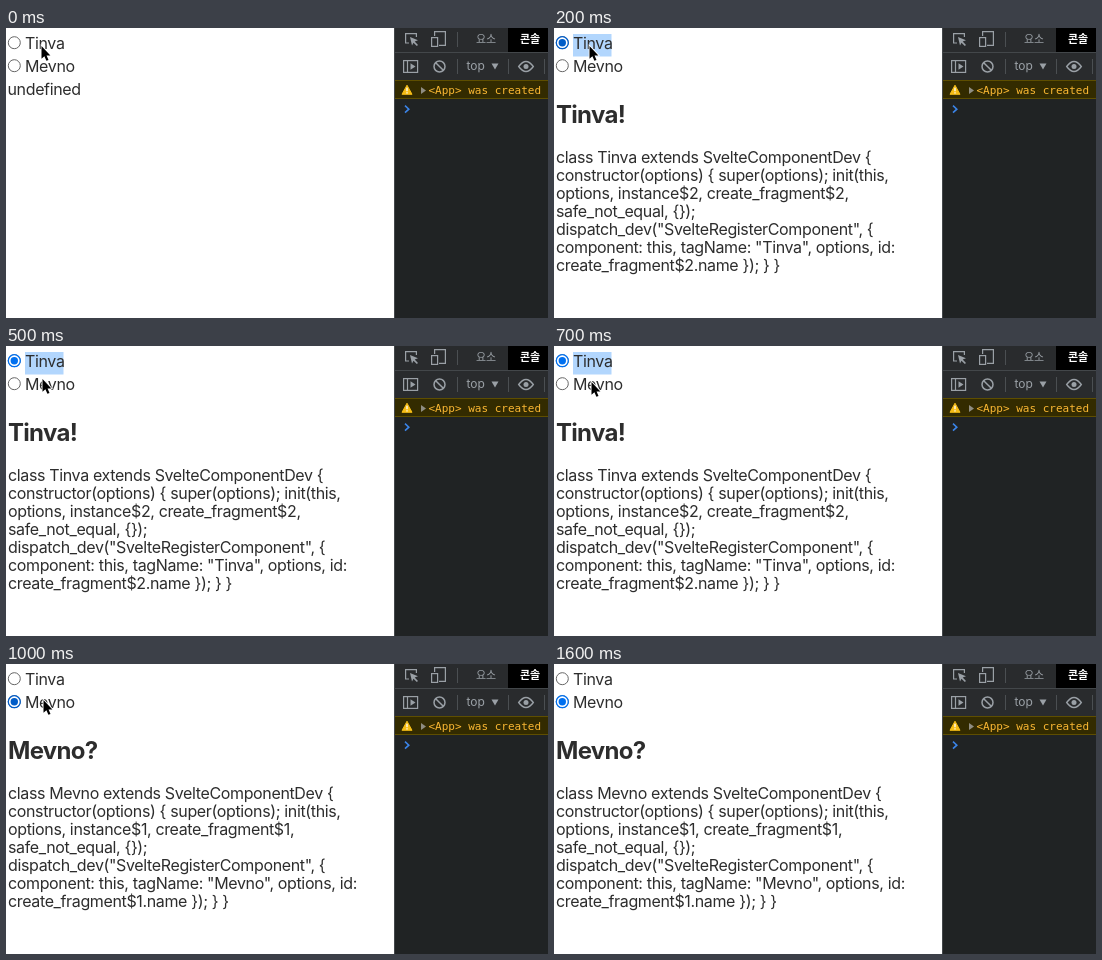
Write an HTML page that moves like this. It is 542 px wide and 290 px high and loops after 1.7 s.

```html
<!DOCTYPE html>
<html lang="ko">
<head>
<meta charset="utf-8">
<title>Component switch</title>
<style>
html, body { margin: 0; width: 100%; height: 100%; overflow: hidden; background: #fff; }
svg { position: absolute; left: 0; top: 0; display: block; }
.page { font: 16px Inter, "Liberation Sans", sans-serif; letter-spacing: -.36px; font-optical-sizing: none; fill: #2d2d2d; color: #2d2d2d; }
.page h2, .page p { position: absolute; left: 2px; margin: 0; white-space: pre; }
.page h2 { top: 72px; font-size: 24px; line-height: 29px; font-weight: 700; letter-spacing: -.7px; }
.page p { top: 120px; line-height: 18px; }
.ring { fill: #fff; stroke: #666; }
.on .ring { stroke: currentColor; stroke-width: 1.3; }
.on .dot { fill: currentColor; }
.ui { font: 12px Inter, "Noto Sans CJK KR", "Noto Sans CJK", sans-serif; fill: #9aa0a6; }
.tab { font-size: 11px; text-anchor: middle; }
.tab.open { fill: #fff; font-weight: 700; }
.icon { fill: none; stroke: #9aa0a6; stroke-width: 1.2; }
.solid { fill: #9aa0a6; stroke: none; }
.log { font: 11px "DejaVu Sans Mono", monospace; fill: #fbb833; }

/* 1700 ms loop, one 100 ms tick = 5.8824% */
.idle, .first, .second, .mark, .on, .press, .cursor { animation: 1.7s step-end infinite; }
.idle { animation-name: idle; }
.first { animation-name: first; }
.second { animation-name: second; }
.mark { animation-name: mark; }
.on { animation-name: tint; }
.press { animation-name: press; }
.cursor { animation-name: move; }
@keyframes idle { 0% { opacity: 1 } 5.882%, 100% { opacity: 0 } }
@keyframes first { 0% { opacity: 0 } 5.882% { opacity: 1 } 58.823%, 100% { opacity: 0 } }
@keyframes second { 0% { opacity: 0 } 58.823%, 100% { opacity: 1 } }
@keyframes mark { 0% { opacity: 0 } 5.882% { opacity: 1 } 52.941%, 100% { opacity: 0 } }
@keyframes press { 0% { stroke: #666 } 52.941% { stroke: #8d8d8d } 58.823%, 100% { stroke: #666 } }
@keyframes tint {
  0% { color: #005cc8 }
  29.411% { color: #0070f0 }
  58.823% { color: #005cc8 }
  70.588%, 100% { color: #0070f0 }
}
@keyframes move {
  0% { transform: translate(35px, 17px) }
  23.529% { transform: translate(35px, 27px) }
  29.411% { transform: translate(36px, 32px) }
  35.294% { transform: translate(37px, 34px) }
  41.176% { transform: translate(37px, 35px) }
  64.705% { transform: translate(41px, 38px) }
  70.588% { transform: translate(66px, 60px) }
  76.470% { transform: translate(112px, 101px) }
  82.352% { transform: translate(164px, 147px) }
  88.235% { transform: translate(187px, 168px); opacity: 1 }
  94.117%, 100% { transform: translate(187px, 168px); opacity: 0 }
}
</style>
</head>
<body>
<div class="page">
  <div class="first"><h2>Tinva!</h2><p>class Tinva extends SvelteComponentDev {
constructor(options) { super(options); init(this,
options, instance$2, create_fragment$2,
safe_not_equal, {});
dispatch_dev("SvelteRegisterComponent", {
component: this, tagName: "Tinva", options, id:
create_fragment$2.name }); } }</p></div>
  <div class="second"><h2>Mevno?</h2><p>class Mevno extends SvelteComponentDev {
constructor(options) { super(options); init(this,
options, instance$1, create_fragment$1,
safe_not_equal, {});
dispatch_dev("SvelteRegisterComponent", {
component: this, tagName: "Mevno", options, id:
create_fragment$1.name }); } }</p></div>
</div>

<svg width="542" height="290" viewBox="0 0 542 290">
  <!-- page form -->
  <g class="page">
    <rect class="mark" x="19" y="6" width="38.5" height="22.5" fill="#b2d6fd"/>
    <circle class="ring" cx="8.3" cy="14.7" r="6"/>
    <circle class="ring press" cx="8.3" cy="37.7" r="6"/>
    <g class="first"><g class="on">
      <circle class="ring" cx="8.3" cy="14.7" r="6"/><circle class="dot" cx="8.3" cy="14.7" r="3.7"/>
    </g></g>
    <g class="second"><g class="on">
      <circle class="ring" cx="8.3" cy="37.7" r="6"/><circle class="dot" cx="8.3" cy="37.7" r="3.7"/>
    </g></g>
    <text x="19" y="21">Tinva</text>
    <text x="19" y="44">Mevno</text>
    <text class="idle" x="1.5" y="67">undefined</text>
  </g>

  <!-- developer tools -->
  <rect x="388" width="154" height="290" fill="#202324"/>
  <rect x="389" width="153" height="52" fill="#292b2d"/>
  <rect x="502" width="40" height="24" fill="#000"/>
  <path d="M388.5 0V290M389 24.5H542" stroke="#43474a"/>
  <path d="M451.5 4V19M451.5 31V46M502.5 31V46M538.5 31V46" stroke="#4b4f52"/>
  <g class="icon">
    <path d="M403 15H399.6V5.6H410.4V9"/>
    <path class="solid" d="M404 9L412 12.3L408.7 13.5L412 17L410.8 18L407.5 14.7L406 17.5Z"/>
    <path d="M428.6 8V3.6H439.4V17.4H433"/>
    <rect x="425.6" y="9.6" width="6" height="8.8"/>
    <rect x="397.6" y="32.6" width="14" height="11.8"/>
    <path d="M401.5 33V44"/>
    <path class="solid" d="M404.5 35.3L409.5 38.5L404.5 41.7Z"/>
    <circle cx="433.5" cy="38.5" r="5.5" stroke-width="1.5"/>
    <path d="M429.7 34.7L437.3 42.3" stroke-width="1.5"/>
    <path d="M512.7 38.5Q520 28.5 527.3 38.5Q520 48.5 512.7 38.5Z" stroke-width="1.4"/>
    <circle class="solid" cx="520" cy="38.5" r="2.5"/>
  </g>
  <g class="ui">
    <text class="tab" x="480" y="14.5">요소</text>
    <text class="tab open" x="524" y="14.5">콘솔</text>
    <text x="460.5" y="42">top</text>
    <path d="M485.5 35.5H492.5L489 41.5Z"/>
  </g>
  <rect x="389" y="52" width="153" height="19" fill="#332b00"/>
  <path d="M389 52.5H542M389 70.5H542" stroke="#5e4e00"/>
  <path d="M401 57.2L406 66.3H396Z" fill="#f6bd16" stroke="#f6bd16" stroke-linejoin="round"/>
  <path d="M401 59.8V63.3M401 64.3V65.6" stroke="#fff" stroke-width="1.3"/>
  <path d="M415 59L420 62.5L415 66Z" fill="#8f8d82"/>
  <text class="log" x="422.5" y="66">&lt;App&gt; was created</text>
  <path d="M399 77.7L402.800 81.2L399 84.7" fill="none" stroke="#3b84e8" stroke-width="1.6"/>

  <path class="cursor" d="M.5 1V13.8L3.400 11.2L5.400 15.8L7.500 14.900L5.600 10.400H9.400Z" stroke="#fff" stroke-width="1.6" paint-order="stroke" fill="#000"/>
</svg>
</body>
</html>
```
